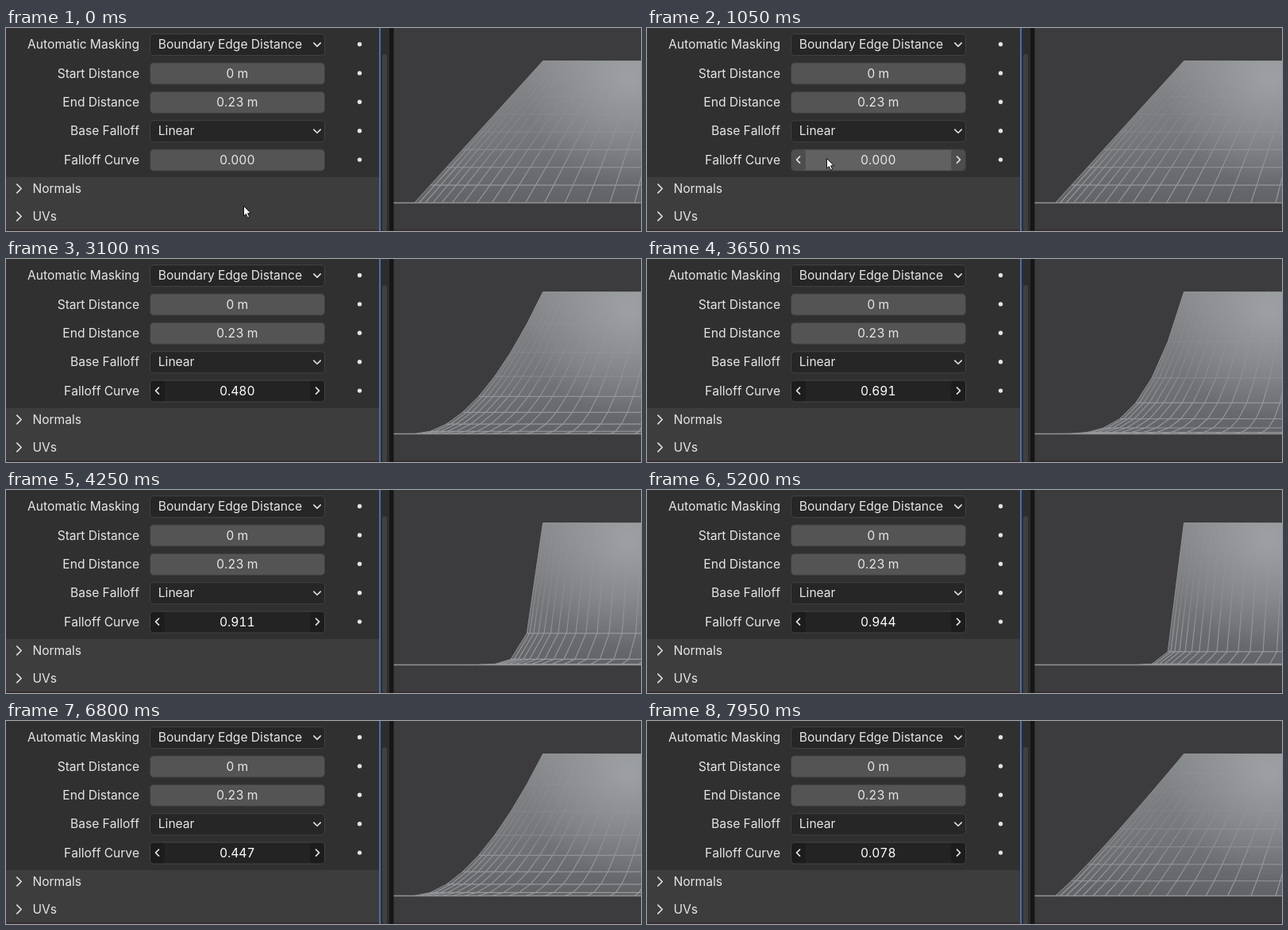
These frames come from a looping animation (800 px wide and 256 px high, 8 s). An HTML page:

```html
<!DOCTYPE html>
<html lang="en">
<head>
<meta charset="utf-8">
<title>Falloff curve</title>
<style>
  html, body { margin: 0; width: 100%; height: 100%; overflow: hidden; background: #303030; }
  svg { display: block; width: 800px; height: 256px; }
  text {
    font: 15.6px Inter, "Open Sans", sans-serif; fill: #e6e6e6;
    font-kerning: none; font-variant-ligatures: none; font-variant-numeric: tabular-nums;
  }
  .label { text-anchor: end; }
  .value { text-anchor: middle; }
  .stroke { fill: none; stroke: #e2e2e2; stroke-width: 1.6; stroke-linecap: round; stroke-linejoin: round; }
  .num { fill: #545454; stroke: #3e3e3e; }
  .menu { fill: #262626; stroke: #414141; }
  .hover { fill: #616161; stroke: #3e3e3e; }
  .drag { fill: #232323; stroke: #434343; }
</style>
</head>
<body>
<svg viewBox="0 0 800 256" xmlns="http://www.w3.org/2000/svg">
  <defs>
    <linearGradient id="face" gradientUnits="userSpaceOnUse" x1="0" y1="41" x2="0" y2="220">
      <stop offset="0" stop-color="#85878a"/>
      <stop offset=".5" stop-color="#77797c"/>
      <stop offset="1" stop-color="#626367"/>
    </linearGradient>
    <radialGradient id="glow" gradientUnits="userSpaceOnUse" cx="785" cy="65" r="135">
      <stop offset="0" stop-color="#b0b3b7" stop-opacity=".6"/>
      <stop offset="1" stop-color="#b0b3b7" stop-opacity="0"/>
    </radialGradient>
    <linearGradient id="wire" gradientUnits="userSpaceOnUse" x1="0" y1="41" x2="0" y2="220">
      <stop offset="0" stop-color="#a4a6a8" stop-opacity=".08"/>
      <stop offset=".38" stop-color="#a4a6a8" stop-opacity=".14"/>
      <stop offset=".6" stop-color="#a4a6a8" stop-opacity=".4"/>
      <stop offset=".76" stop-color="#a4a6a8" stop-opacity=".7"/>
      <stop offset="1" stop-color="#a4a6a8" stop-opacity=".8"/>
    </linearGradient>
    <clipPath id="view"><rect x="488.5" y="0" width="311.5" height="256"/></clipPath>
  </defs>

  <rect width="800" height="256" fill="#303030"/>
  <rect y="188" width="470" height="67" fill="#3d3d3d"/>
  <g id="panel"></g>
  <rect y="254" width="484" height="2" fill="#372c30"/>
  <rect x="470" width="2" height="256" fill="#4a70ab"/>
  <rect x="472" width="11" height="256" fill="#2d2d2d"/>
  <rect x="474" y="33" width="6" height="223" rx="3" fill="#404040"/>
  <rect x="483" width="6" height="256" fill="#161616"/>

  <g clip-path="url(#view)">
    <rect x="488" width="312" height="256" fill="#3c3c3e"/>
    <path id="body" fill="url(#face)"/>
    <path id="light" fill="url(#glow)"/>
    <path id="grid" fill="none" stroke="url(#wire)" stroke-width="1.15"/>
    <path id="rim" fill="none" stroke="#909294" stroke-width="1"/>
    <path d="M488 220.5H800" stroke="#919294" stroke-width="1.5"/>
  </g>
  <rect x="489" y="254" width="311" height="2" fill="#372f33"/>

  <path id="cursor" d="M0 0V12.6L2.9 10L5 14.7L7.2 13.7L5.1 9.2H9Z" fill="#fff" stroke="#111" stroke-width="1"/>
</svg>
<script>
const $ = id => document.getElementById(id);
const LOOP = 8000, STEP = 50, GRAB = 1300;
const LEFT = 514.5, LEAN = 162, BASE = 220.5, RISE = 179, CENTER = 900, ROWS = 8;

const valueKeys = [
  [1250, 0], [1700, .03], [2150, .118], [2600, .28], [3100, .48], [3700, .71],
  [4250, .911], [4550, .966], [4800, .985], [4950, .985], [5250, .932],
  [5900, .719], [6800, .447], [7950, .078], [8000, .063]
];
const cursorX = [[0, 299.5], [100, 299.5], [850, 291.5], [1050, 226.5]];
const cursorY = [[0, 224.5], [100, 224.5], [850, 164.5], [1050, 164.5]];

// Monotone cubic interpolation through [time, value] keys.
function sample(keys, t) {
  const last = keys.length - 1;
  if (t <= keys[0][0]) return keys[0][1];
  if (t >= keys[last][0]) return keys[last][1];
  const slope = i => (keys[i + 1][1] - keys[i][1]) / (keys[i + 1][0] - keys[i][0]);
  const tangent = i => {
    if (i === 0) return 0;
    if (i === last) return slope(i - 1);
    const a = slope(i - 1), b = slope(i);
    return a * b > 0 ? 2 * a * b / (a + b) : 0;
  };
  let i = 0;
  while (t >= keys[i + 1][0]) i++;
  const [t0, v0] = keys[i], [t1, v1] = keys[i + 1];
  const h = t1 - t0, u = (t - t0) / h, w = 1 - u;
  return v0 * (1 + 2 * u) * w * w + h * tangent(i) * u * w * w
       + v1 * u * u * (3 - 2 * u) - h * tangent(i + 1) * u * u * w;
}

const chevron = (x, y, dir, s) => `<path class="stroke" d="${
  dir === "down" ? `M${x - s} ${y - s / 2}l${s} ${s}l${s} ${-s}`
  : dir === "left" ? `M${x + s / 2} ${y - s}l${-s} ${s}l${s} ${s}`
  : `M${x - s / 2} ${y - s}l${s} ${s}l${-s} ${s}`}"/>`;
const box = (y, kind, id = "") =>
  `<rect ${id} class="${kind}" x="181.5" y="${y - 13}" width="220" height="27" rx="4.5"/>`;
const endZone = (x, y) =>
  `<rect x="${x}" y="${y - 12.5}" width="18" height="26" rx="4" fill="#000" opacity=".2"/>`;

function buildPanel() {
  const rows = [
    ["Automatic Masking", "Boundary Edge Distance", "menu"],
    ["Start Distance", "0 m", "num"],
    ["End Distance", "0.23 m", "num"],
    ["Base Falloff", "Linear", "menu"],
    ["Falloff Curve", "0.000", "num"]
  ];
  let out = "";
  rows.forEach(([label, value, kind], i) => {
    const y = 20.5 + 36.4 * i, base = y + 5.7, active = i === 4;
    out += `<text class="label" x="168" y="${base}">${label}</text>`;
    out += box(y, kind, active ? 'id="field"' : "");
    if (active) {
      out += `<g id="arrows">${endZone(182, y)}${endZone(383, y)}`
        + `${chevron(190.5, y, "left", 4)}${chevron(392.5, y, "right", 4)}</g>`;
    }
    out += kind === "menu"
      ? `<text x="191.8" y="${base}">${value}</text>` + chevron(392, y + .5, "down", 4.2)
      : `<text class="value" ${active ? 'id="value"' : ""} x="291.2" y="${base}">${value}</text>`;
    out += `<circle cx="445.5" cy="${y}" r="2.7" fill="#e4e4e4"/>`;
  });
  [["Normals", 202.5], ["UVs", 237.5]].forEach(([name, y]) => {
    out += chevron(16.5, y, "right", 5.4) + `<text x="33.5" y="${y + 5.5}">${name}</text>`;
  });
  $("panel").innerHTML = out;
}

// Columns crowd towards the left edge and lean to a common centre.
const columns = Array.from({ length: 17 }, (_, k) => LEFT + 5 * k + .9 * k * k);
const pointAt = (x, t, power) => {
  const lean = LEAN * (CENTER - x) / (CENTER - LEFT);
  return [(x + lean * t).toFixed(2), (BASE - RISE * t ** power).toFixed(2)];
};

function drawMesh(value) {
  const power = 1 / (1 - value);
  const line = x => "M" + Array.from({ length: ROWS + 1 },
    (_, i) => pointAt(x, i / ROWS, power).join(" ")).join("L");
  const edge = line(LEFT);
  let grid = columns.slice(1).map(line).join("");
  for (let i = 1; i < ROWS; i++) {
    const [x, y] = pointAt(LEFT, i / ROWS, power);
    grid += `M${x} ${y}H800`;
  }
  const shape = edge + `H800V${BASE}Z`;
  $("body").setAttribute("d", shape);
  $("light").setAttribute("d", shape);
  $("grid").setAttribute("d", grid);
  $("rim").setAttribute("d", edge + "H800");
}

function render(time) {
  const t = Math.floor((time % LOOP) / STEP) * STEP;
  const value = sample(valueKeys, t);
  const x = sample(cursorX, t), y = sample(cursorY, t);
  const dragging = t >= GRAB, hover = !dragging && y < 180;
  $("field").setAttribute("class", dragging ? "drag" : hover ? "hover" : "num");
  $("arrows").style.display = dragging || hover ? "" : "none";
  $("value").textContent = value.toFixed(3);
  $("value").style.fill = dragging ? "#fff" : "";
  $("cursor").style.display = dragging ? "none" : "";
  $("cursor").setAttribute("transform", `translate(${x} ${y})`);
  drawMesh(value);
}

buildPanel();
const start = performance.now();
function tick() {
  render(performance.now() - start);
  requestAnimationFrame(tick);
}
tick();
</script>
</body>
</html>
```
